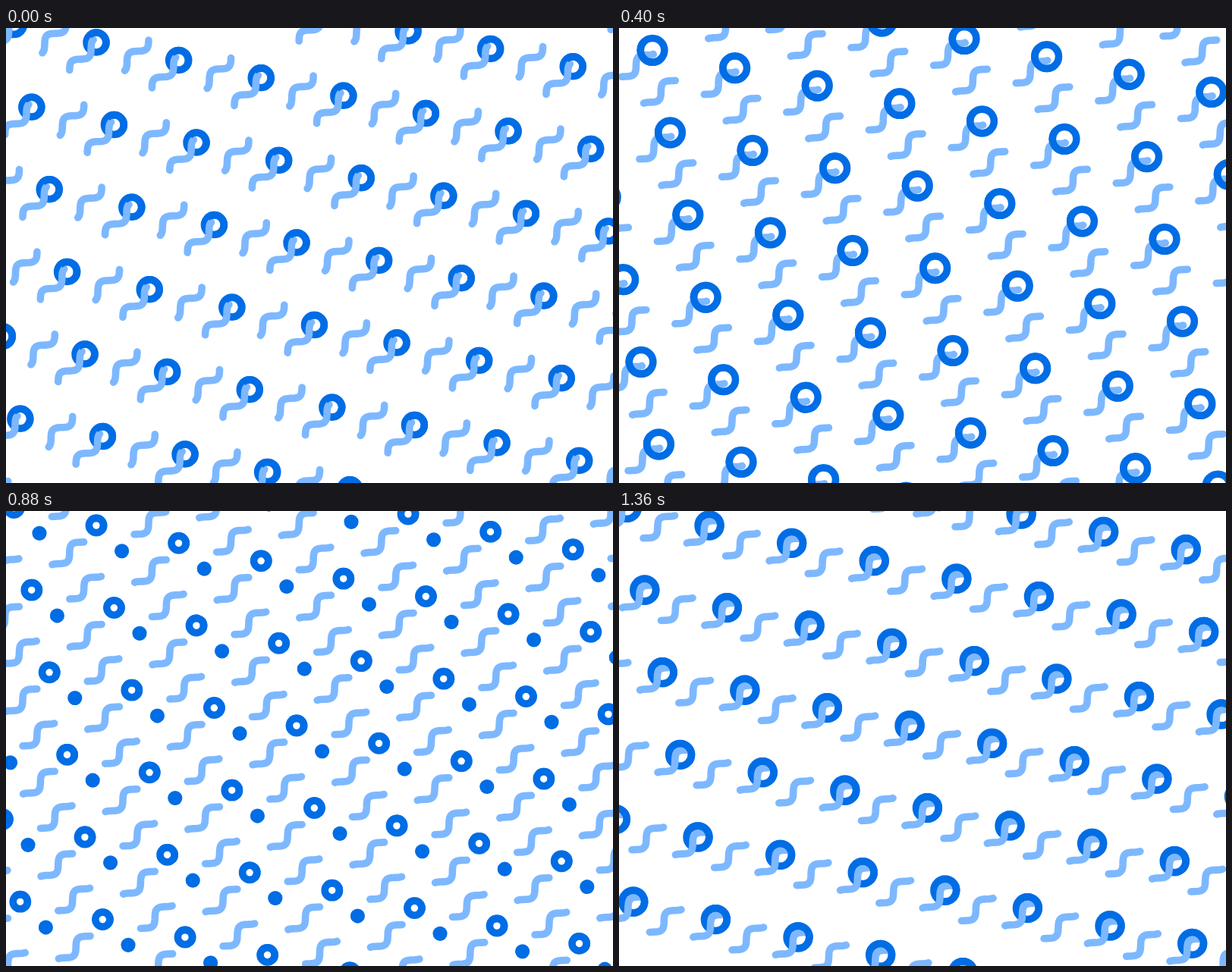
These frames come from a looping animation (800 by 600 pixels, 1440 ms). An HTML page:

```html
<!DOCTYPE html>
<html lang="en">
<head>
<meta charset="utf-8">
<title>Rings and waves</title>
<style>
  html, body { margin: 0; width: 100%; height: 100%; overflow: hidden; background: #fff; }
  svg { display: block; width: 800px; height: 600px; }
  .ring { fill: none; stroke: #006de5; stroke-width: 9.6; }
  .wave { fill: none; stroke: #7db8ff; stroke-width: 9.6; stroke-linecap: round; stroke-linejoin: round; }
</style>
</head>
<body>
<svg viewBox="0 0 800 600">
  <defs id="defs"></defs>
  <g id="field"></g>
</svg>
<script>
const LOOP = 1440, STEP = 80;
const COL = [108.6, 23.4], ROW = [23.4, 108.6];   // lattice vectors
const START = [119, 19], PAIR = 33.7;             // first ring, offset to its partner
const PITCH = 85.2 * Math.SQRT2;                  // lattice spacing along the diagonal
const LAMBDA = PITCH / 3, AMP = 6, LENGTH = 50.5, REST = -25.5, AXIS = 0.8;

const defs = document.getElementById('defs');
const field = document.getElementById('field');

function add(parent, tag, attrs) {
  const el = document.createElementNS('http://www.w3.org/2000/svg', tag);
  for (const key in attrs) el.setAttribute(key, attrs[key]);
  return parent.appendChild(el);
}

// A unit is a ring with a wave threaded through it along the local x axis.
function makeUnit(id, delay) {
  const g = add(defs, 'g', { id });
  return {
    delay,
    ring: add(g, 'circle', { class: 'ring' }),
    wave: add(g, 'path', { class: 'wave' }),
    front: add(g, 'path', { class: 'ring' })
  };
}

const units = [makeUnit('a', LOOP / 2), makeUnit('b', 0)];

for (let i = -8; i <= 10; i++) {
  for (let j = -4; j <= 8; j++) {
    const x = START[0] + i * COL[0] + j * ROW[0];
    const y = START[1] + i * COL[1] + j * ROW[1];
    if (x < -150 || x > 950 || y < -150 || y > 750) continue;
    add(field, 'use', { href: '#a', transform: `translate(${x} ${y}) rotate(-45)` });
    add(field, 'use', { href: '#b', transform: `translate(${x + PAIR} ${y + PAIR}) rotate(135)` });
  }
}

const mod = (v, n) => ((v % n) + n) % n;

function radius(t) {
  const d = Math.abs(mod(t, LOOP) - 480);
  return Math.max(0, 16 - 11.3 * Math.pow(d / 400, 2.55));
}

function wavePath(t) {
  const travel = PITCH * t / (LOOP / 2);
  const mid = mod(REST - travel + PITCH / 2, PITCH) - PITCH / 2;
  const pts = [];
  for (let k = 0; k <= 40; k++) {
    const x = mid + LENGTH * (k / 40 - 0.5);
    const y = AXIS + AMP * Math.sin(2 * Math.PI * (x - REST) / LAMBDA + Math.PI / 4);
    pts.push(x.toFixed(2) + ' ' + y.toFixed(2));
  }
  return 'M' + pts.join('L');
}

function draw(t) {
  const d = wavePath(t);
  for (const u of units) {
    const r = radius(t - u.delay);
    u.ring.setAttribute('r', r);
    u.wave.setAttribute('d', d);
    u.front.setAttribute('d', r ? `M0 ${-r}A${r} ${r} 0 0 1 0 ${r}` : '');
  }
}

let shown = -1;
const begin = performance.now();

function tick() {
  const t = Math.floor(mod(performance.now() - begin, LOOP) / STEP) * STEP;
  if (t !== shown) draw(shown = t);
  requestAnimationFrame(tick);
}
tick();
</script>
</body>
</html>
```
